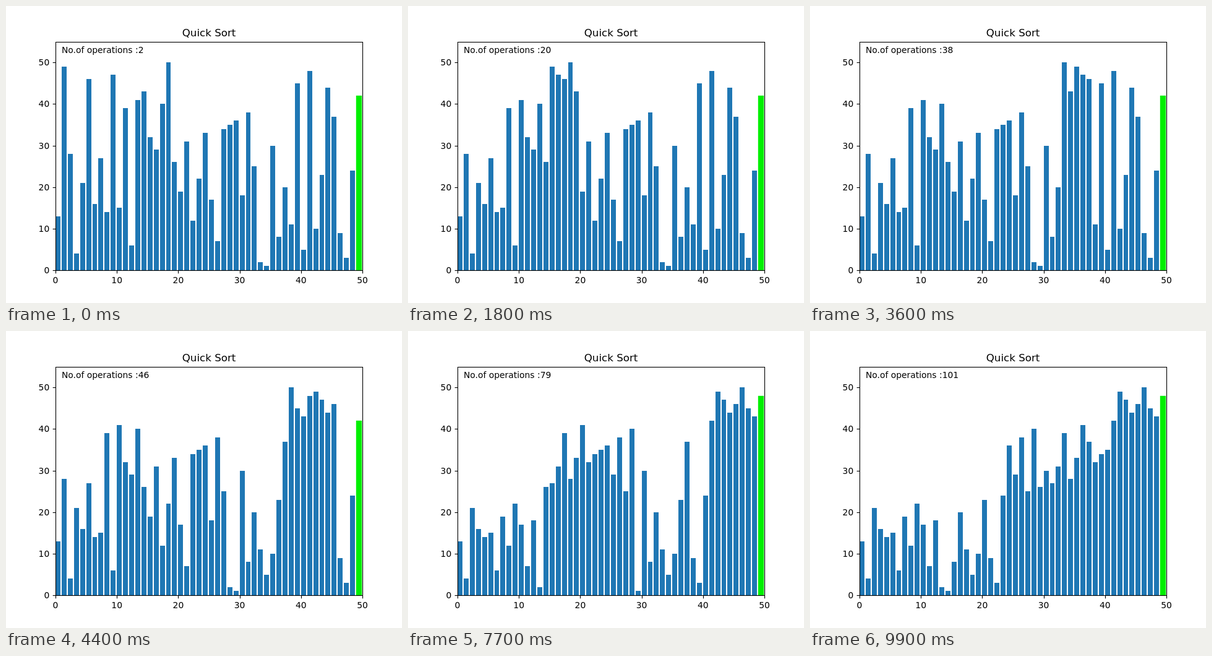
An HTML page with a canvas that plays this animation: 640x480 px, repeating every 10000 ms.

```html
<!DOCTYPE html>
<html lang="en">
<head>
<meta charset="utf-8">
<title>Quick Sort</title>
<style>
html, body { margin: 0; width: 100%; height: 100%; overflow: hidden; background: #fff; }
canvas { display: block; }
</style>
</head>
<body>
<canvas id="chart" width="640" height="480"></canvas>
<script>
const ctx = document.getElementById('chart').getContext('2d');
const STEP = 100, STEPS = 100, FIRST_COUNT = 2;
const LEFT = 80, TOP = 57.6, WIDTH = 496, BASE = 427.2, UNIT = 6.72;
const LINE = 1.11;
const values = [
  13, 49, 28, 4, 21, 46, 16, 27, 14, 47, 15, 39, 6, 41, 43, 32, 29,
  40, 50, 26, 19, 31, 12, 22, 33, 17, 7, 34, 35, 36, 18, 38, 25, 2,
  1, 30, 8, 20, 11, 45, 5, 48, 10, 23, 44, 37, 9, 3, 24, 42
];
const slot = WIDTH / values.length;

// Pauses after every comparison and after placing the pivot.
function* quickSort(a, lo, hi) {
  if (lo >= hi) return;
  const swap = (i, j) => { [a[i], a[j]] = [a[j], a[i]]; };
  let next = lo;
  for (let j = lo; j < hi; j++) {
    if (a[j] < a[hi]) swap(next++, j);
    yield a;
  }
  swap(next, hi);
  yield a;
  yield* quickSort(a, lo, next - 1);
  yield* quickSort(a, next + 1, hi);
}

const states = [];
for (const state of quickSort([...values], 0, values.length - 1)) {
  states.push([...state]);
  if (states.length === FIRST_COUNT + STEPS) break;
}

const xAt = i => LEFT + i * slot;
const yAt = v => BASE - v * UNIT;
const crisp = n => Math.round(n) + 0.5;

function line(x1, y1, x2, y2) {
  ctx.beginPath();
  ctx.moveTo(x1, y1);
  ctx.lineTo(x2, y2);
  ctx.stroke();
}

function text(str, x, y, align = 'left', size = 13.889) {
  ctx.font = `${size}px "DejaVu Sans", sans-serif`;
  ctx.textAlign = align;
  ctx.fillText(str, x, y);
}

function drawBars(bars) {
  ctx.save();
  ctx.beginPath();
  ctx.rect(LEFT, 58, WIDTH, 369);
  ctx.clip();
  bars.forEach((v, i) => {
    const x = Math.round(xAt(i)), y = Math.round(yAt(v));
    const w = Math.round(xAt(i + 0.8)) - x, h = Math.round(BASE) - y;
    if (i < bars.length - 1) {
      ctx.fillStyle = '#1f77b4';
      ctx.fillRect(x, y, w, h);
    } else {
      ctx.fillStyle = ctx.strokeStyle = '#00f000';
      ctx.lineWidth = 1.39;
      ctx.fillRect(x + 0.5, y + 0.5, w, h);
      ctx.strokeRect(x + 0.5, y + 0.5, w, h);
    }
  });
  ctx.restore();
}

function drawAxes() {
  ctx.fillStyle = ctx.strokeStyle = '#000';
  ctx.lineWidth = LINE;
  const left = crisp(LEFT), top = crisp(TOP), bottom = crisp(BASE);
  ctx.strokeRect(left, top, WIDTH, bottom - top);
  for (let n = 0; n <= 50; n += 10) {
    const x = crisp(xAt(n)), y = crisp(yAt(n));
    line(x, bottom, x, bottom + 4.86);
    line(left, y, left - 4.86, y);
    text(n, xAt(n), 448, 'center');
    text(n, 70.28, Math.round(yAt(n) + 5.07), 'right');
  }
  text('Quick Sort', LEFT + WIDTH / 2, 49, 'center', 16.667);
}

function draw() {
  const count = FIRST_COUNT + Math.floor(performance.now() / STEP) % STEPS;
  ctx.fillStyle = '#fff';
  ctx.fillRect(0, 0, 640, 480);
  drawBars(states[count - 1]);
  drawAxes();
  text('No.of operations :' + count, 89.92, 76);
  requestAnimationFrame(draw);
}
draw();
</script>
</body>
</html>
```
